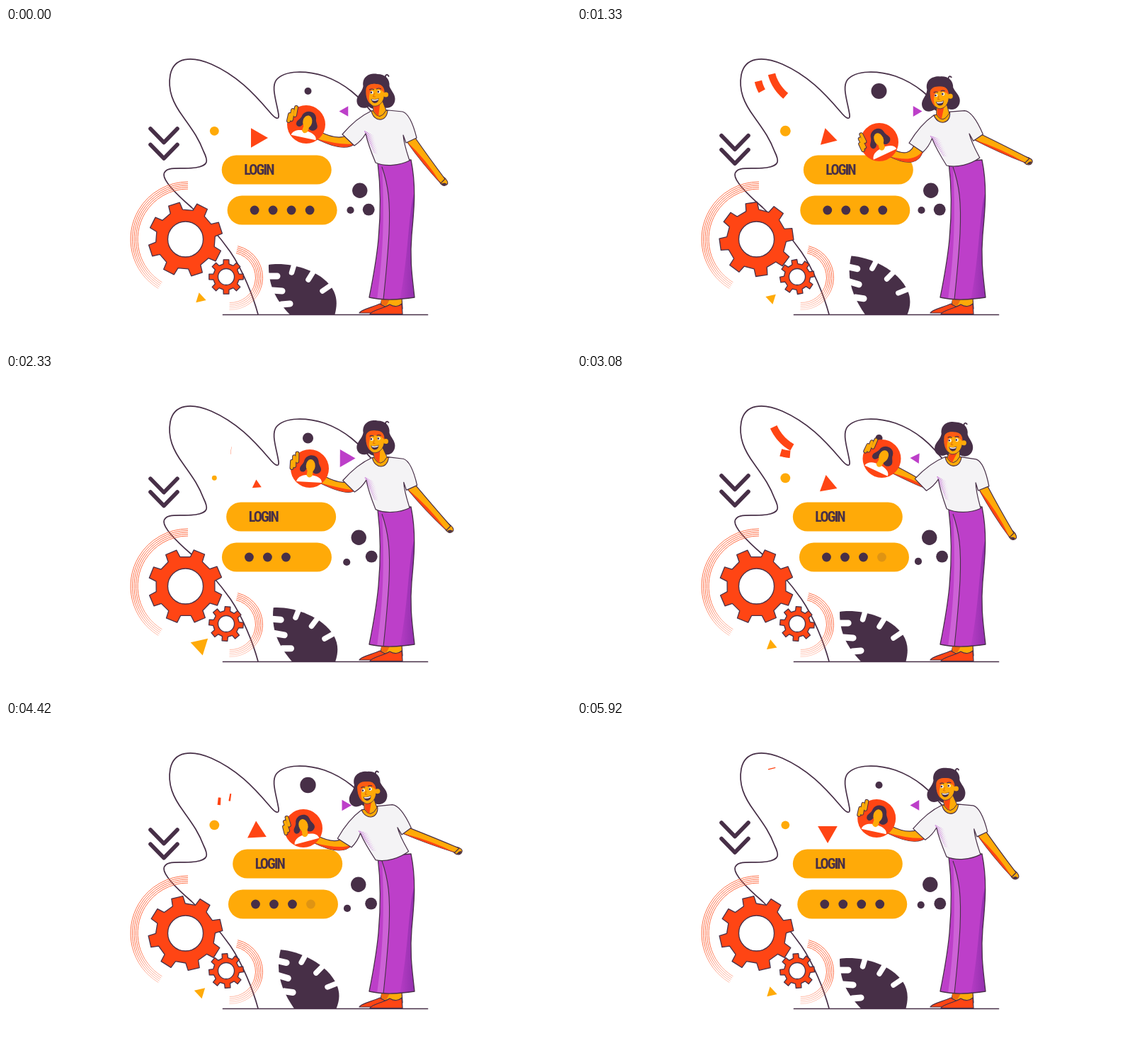
These frames come from a looping animation (798x450 px, 6.01 s). An HTML page with a canvas:

```html
<!DOCTYPE html>
<html lang="en">
<head>
<meta charset="utf-8">
<title>Login illustration</title>
<style>
  html, body { margin: 0; width: 100%; height: 100%; overflow: hidden; background: #fff; }
  canvas { display: block; width: 798px; height: 450px; }
</style>
</head>
<body>
<canvas id="stage" width="798" height="450"></canvas>
<script>
const ctx = document.getElementById('stage').getContext('2d');
const DARK = '#472f47', RED = '#ff4514', AMBER = '#ffaa08', PURPLE = '#bd3fc9', SHIRT = '#f4f3f5';
const TAU = Math.PI * 2, RAD = Math.PI / 180;
const LOOP = 6010, STEP = 6000 / 72;
const HIP = [546, 192];

// Poses: time, avatar x/y, avatar tilt, head x/y, body lean, free hand x/y
const POSES = [
  [0, 424, 136, 0, 522.5, 90, 0, 618, 217],
  [1333, 427, 161, -37, 513, 93.5, -9.5, 637, 188],
  [2333, 429, 132, -9, 522.5, 89.5, 1, 626, 217],
  [3083, 430.5, 118, 13, 532.5, 91.5, 3, 615, 227],
  [4417, 420, 150, -27, 510.5, 95, -11, 638, 182],
  [5333, 414, 147, -14, 503.5, 93, -9.5, 629, 195]
];

const clamp = v => Math.max(0, Math.min(1, v));
const smooth = v => { v = clamp(v); return v * v * (3 - 2 * v); };

function poseAt(t) {
  const n = POSES.length;
  const key = i => {
    const turn = Math.floor(i / n), row = POSES[i - turn * n].slice();
    row[0] += turn * 6000;
    return row;
  };
  let i = n - 1;
  while (POSES[i][0] > t) i--;
  const [a, b, c, d] = [key(i - 1), key(i), key(i + 1), key(i + 2)];
  const span = c[0] - b[0], u = (t - b[0]) / span;
  return b.map((v, k) => {
    const m0 = (c[k] - a[k]) / (c[0] - a[0]) * span;
    const m1 = (d[k] - v) / (d[0] - b[0]) * span;
    return smooth(u) * (c[k] - v) + v + u * (1 - u) * ((1 - u) * m0 - u * m1);
  });
}

function linear(keys, p) {
  let i = 0;
  while (i < keys.length - 2 && keys[i + 1][0] <= p) i++;
  const [a, b] = [keys[i], keys[i + 1]], u = (p - a[0]) / (b[0] - a[0]);
  return a.map((v, k) => v + (b[k] - v) * u);
}

function shape(path, fill, line = 0, color = DARK) {
  const p = typeof path === 'string' ? new Path2D(path) : path;
  if (fill) { ctx.fillStyle = fill; ctx.fill(p); }
  if (line) { ctx.strokeStyle = color; ctx.lineWidth = line; ctx.stroke(p); }
}

function dot(x, y, r, fill, alpha = 1) {
  ctx.globalAlpha = alpha;
  ctx.fillStyle = fill;
  ctx.beginPath();
  ctx.arc(x, y, r, 0, TAU);
  ctx.fill();
  ctx.globalAlpha = 1;
}

function turned(x, y, deg, draw) {
  ctx.save();
  ctx.translate(x, y);
  ctx.rotate(deg * RAD);
  draw();
  ctx.restore();
}

function triangle(x, y, r, deg, fill) {
  const p = new Path2D();
  for (let i = 0; i < 3; i++) {
    const a = (deg + i * 120) * RAD;
    p.lineTo(x + r * Math.cos(a), y + r * Math.sin(a));
  }
  shape(p, fill);
}

function gear(x, y, inner, outer, hole, deg) {
  const p = new Path2D();
  for (let i = 0; i < 8; i++) {
    for (const [off, r] of [[-12.5, inner], [-9, outer], [9, outer], [12.5, inner]]) {
      const a = (deg + i * 45 + off) * RAD;
      p.lineTo(x + r * Math.cos(a), y + r * Math.sin(a));
    }
  }
  p.closePath();
  shape(p, RED, 1.3);
  dot(x, y, hole, '#fff');
  ctx.strokeStyle = DARK;
  ctx.stroke();
}

function rings(x, y, r, from, to) {
  const fade = ctx.createLinearGradient(0, y + r * 0.2, 0, y + r);
  fade.addColorStop(0, '#ff7048');
  fade.addColorStop(1, 'rgba(255,112,72,.3)');
  ctx.strokeStyle = fade;
  ctx.lineWidth = 1;
  for (let i = 0; i < 5; i++) {
    ctx.beginPath();
    ctx.arc(x, y, r - i * 2.5, from * RAD, to * RAD);
    ctx.stroke();
  }
}

// A wide arc that enters at its far end and leaves at its near end
function ribbon([x0, y0, x1, y1, x2, y2, x3, y3], u) {
  if (u <= 0 || u >= 1) return;
  const from = 1 - smooth(u / 0.64), to = 1 - u * u;
  ctx.beginPath();
  for (let i = 0; i <= 16; i++) {
    const s = from + (to - from) * i / 16, r = 1 - s;
    const mix = (a, b, c, d) => r * r * r * a + 3 * r * r * s * b + 3 * r * s * s * c + s * s * s * d;
    ctx.lineTo(mix(x0, x1, x2, x3), mix(y0, y1, y2, y3));
  }
  ctx.strokeStyle = RED;
  ctx.lineWidth = 10.5;
  ctx.lineCap = 'butt';
  ctx.stroke();
}

function chevron(y) {
  ctx.lineCap = ctx.lineJoin = 'round';
  shape(`M204 ${y}L223 ${y + 19.5}L242 ${y}`, null, 5.6);
}

function field(x, y) {
  ctx.fillStyle = AMBER;
  ctx.beginPath();
  ctx.roundRect(x, y, 155, 41, 20.5);
  ctx.fill();
}

function backdrop(t, sway) {
  shape('M356 404C349 378 334 341 317 316C298 289 282 272 262 253C240 234 223 217 223 207' +
    'C224 193 250 200 268 197C286 194 286 188 279 174C271 153 261 141 250 125' +
    'C236 106 228 88 232 66C237 41 262 39 290 51C326 67 349 91 372 118' +
    'C381 129 386 130 385 122C382 103 374 83 382 73C394 59 425 60 450 68C478 78 500 96 522 126', null, 1.7);
  rings(257, 298, 81, 121, 270);
  rings(317, 352, 45.5, -77, 92);
  const spin = t / 6000 * 360;
  gear(253.5, 298, 42, 52.5, 25, -108 - spin);
  gear(311, 351, 18.5, 24.5, 11.5, -90 + spin);
  chevron(142 + 10 * sway);
  chevron(164.5 + 8 * sway ** 3);
}

function confetti(t, p, sway, swing) {
  dot(294.3, 145.3, 6.4 + 3 * swing, AMBER);
  dot(426.5, 89, 5 + 6.2 * sway, DARK);

  const [, redTurn, redSize] = linear([[0, 0, 16], [.027, 20, 14.3], [.443, 135, 14], [.473, 147, 15.5],
    [.777, 265, 7.5], [.973, 330, 16], [1, 360, 16]], p);
  triangle(354, 155, redSize, redTurn, RED);

  const [, turn, size] = linear([[0, 0, 8.5], [.443, 60, 8.5], [.777, 60, 14.5], [.973, 120, 8.5], [1, 120, 8.5]], p);
  triangle(479, 117.5, size, turn + 180, PURPLE);
  triangle(274.5, 381.5, size, turn + 17, AMBER);

  ribbon([275, 65, 279, 83, 297, 104, 318, 106.5], (t % 2000 - 285) / 1650);
  for (const start of [110, 2805, 4278]) ribbon([256, 75, 261, 98, 279, 111, 304, 112], (t - start) / 1390);
}

function form(beat, sway, swing) {
  const x = 304.7 + 15.6 * sway;
  field(x, 179.5);
  ctx.fillStyle = DARK;
  ctx.font = 'bold 20px "Roboto Condensed", "Open Sans Condensed", "Open Sans", sans-serif';
  ctx.fontStretch = 'extra-condensed';
  ctx.letterSpacing = '-1.8px';
  ctx.textBaseline = 'alphabetic';
  ctx.fillText('LOGIN', x + 31.5, 207.2);

  const y = 236.5, left = 312.6 + 7.8 * swing;
  field(left, y);
  const pulse = (1 + Math.cos(beat * TAU)) / 2;
  for (let i = 0; i < 4; i++) dot(left + 38.5 + i * 26, y + 20.5, 6.4, DARK, i < 3 ? 1 : clamp(pulse * 1.2));

  const out = 1 - pulse;
  dot(499 + 1.3 * Math.cos((beat - 0.15) * TAU), 229.3, 10.7, DARK);
  dot(486.5 - 5.3 * out, 257 + 7 * out, 5.1, DARK);
  dot(512.2 + 4 * out, 256.2, 8.4, DARK);
}

function leaf(sway) {
  ctx.save();
  ctx.beginPath();
  ctx.rect(340, 290, 160, 114);
  ctx.clip();
  turned(437, 404, 12.7 * sway, () => {
    ctx.translate(-437, -404);
    shape('M371 334C395 330 440 338 460 366C469 380 469 394 460 418L416 418C390 396 370 372 371 334Z', DARK);
    ctx.lineCap = 'round';
    shape('M408 330L403.5 345M437 339L427 355M466 358L447 371', null, 7.5, '#fff');
    shape('M371 350L383 350M376 370L390 371M389 390L401 389', null, 9, '#fff');
  });
  ctx.restore();
}

function legs() {
  ctx.lineJoin = 'round';
  shape('M531 380L529 392L538 398L560 396L559 380Z', AMBER, 1.2);
  shape('M530 383L542 383L537 392L530 390Z', '#f06a10');
  shape('M499 402C501 397 518 394 528 389C533 393 538 391 541 402Z', RED, 1.2);
  shape('M514 403.5C517 398 533 396 542 390C548 394 555 393 559 389L560 403.5Z', RED, 1.2);

  const body = new Path2D('M525 190C530 230 529 265 526 298C523 330 518 355 513 380C535 385 556 383 577 380' +
    'C574 352 570 328 573 292C576 258 580 225 572 186Z');
  shape(body, PURPLE);
  ctx.save();
  ctx.clip(body);
  shape('M531 196C540 222 543 245 541 290C539 325 536 355 533 383L524 383C530 340 536 280 531 196Z', '#cd62d6');
  const shade = ctx.createLinearGradient(552, 0, 578, 0);
  shade.addColorStop(0, 'rgba(125,40,160,0)');
  shade.addColorStop(1, 'rgba(125,40,160,.7)');
  shape('M577 230C568 260 569 320 556 384L580 384Z', shade);
  ctx.restore();
  shape(body, null, 1.3);
  shape('M531 196C540 222 543 245 541 290C539 325 536 355 533 383', null, 1.1);
}

function torso() {
  const shirt = new Path2D('M516 117C503 123 487 136 475 150L492 166C498 162 504 156 508 149C511 163 517 178 522 190' +
    'C536 196 556 194 570 187C566 175 562 164 561 151L565 162L580 155C576 139 570 121 560 118L540 116Z');
  shape(shirt, SHIRT);
  ctx.save();
  ctx.clip(shirt);
  ctx.fillStyle = '#c779d6';
  for (let row = 0; row < 16; row++) {
    for (let col = 0; col < 8; col++) {
      const r = 0.85 - col * 0.11 - row * 0.025;
      if (r > 0.1) ctx.fillRect(506 + col * 2 + row * 0.9, 145 + row * 2 + col, r * 1.8, r * 1.8);
    }
  }
  ctx.restore();
  shape(shirt, null, 1.2);
  shape('M516 117C519 133 538 134 539 116Z', AMBER, 1.1);
}

function head(x, y, neck, tilt) {
  turned(x, y, tilt, () => {
    shape('M-18 -8C-20 -22 -8 -27 2 -25C13 -25 20 -18 19 -8C21 -2 27 3 27 10C27 20 18 26 9 21' +
      'C2 25 -6 25 -10 21C-20 26 -28 20 -27 11C-26 4 -19 0 -18 -8Z', DARK);
    shape('M14 -18C12 -24 16 -26 18 -22', null, 1.8);
  });
  const [nx, ny] = neck;
  shape(`M${x - 5} ${y + 13}L${nx - 8} ${ny - 4}Q${nx + 1} ${ny + 10} ${nx + 10} ${ny - 6}L${x + 8} ${y + 10}Z`, AMBER, 1);
  shape(`M${x - 4} ${y + 15}L${nx - 7} ${ny - 4}L${nx - 1} ${ny + 3}L${x + 6} ${y + 15}Z`, RED);
  turned(x, y, tilt, () => {
    shape('M-14 -4C-15 8 -11 16 -4 20C4 22 12 14 12 3C13 -6 8 -11 0 -11C-8 -12 -13 -9 -14 -4Z', AMBER, 0.8);
    shape('M-14 -4C-15 8 -11 14 -8 17C-11 9 -10 1 -5 -4C2 -5 8 -4 12 2C12 -7 8 -11 0 -11C-8 -12 -13 -9 -14 -4Z', '#ff5c14');
    dot(14, 4, 3.5, AMBER);
    for (const [ex, ey] of [[-6, 1], [4, 0]]) {
      dot(ex, ey, 2.3, '#fff');
      dot(ex - 0.7, ey, 1.4, DARK);
      shape(`M${ex - 3} ${ey - 4}Q${ex} ${ey - 6} ${ex + 3} ${ey - 4}`, null, 1.2);
    }
    shape('M-2 2L-4 7L-1 7', null, 0.8, '#d65a10');
    shape('M-7 10Q-1 12 4 9Q4 16 -2 16Q-6 15 -7 10Z', DARK);
    shape('M-6 10.5Q-1 12 3.5 10L3 11.5Q-1 13.5 -5.5 12Z', '#fff');
  });
}

function avatar(x, y, tilt) {
  dot(x, y, 27, RED);
  turned(x, y, tilt + 12, () => {
    ctx.save();
    ctx.beginPath();
    ctx.arc(0, 0, 26, 0, TAU);
    ctx.clip();
    shape('M-18 19C-16 10 -6 9 0 9C9 9 18 12 18 19Z', '#fff');
    shape('M-8 -12C-5 -21 10 -22 12 -11C12 -5 19 -1 15 4C11 9 5 7 3 3L-5 1C-7 7 -14 6 -14 1C-14 -4 -9 -5 -8 -12Z', DARK);
    shape('M-3 2L-4 10Q0 15 4 10L5 2Z', AMBER);
    ctx.fillStyle = AMBER;
    ctx.beginPath();
    ctx.ellipse(1, -4, 6.5, 9, 0, 0, TAU);
    ctx.fill();
    ctx.restore();
  });
  turned(x, y, tilt, () => {
    ctx.lineCap = 'round';
    const fingers = 'M-25 -5L-23 -14M-21 -7L-19 -20M-16 -13L-14 -24';
    shape(fingers, null, 6, DARK);
    shape(fingers, null, 4, AMBER);
  });
}

function woman(t) {
  const [, ax, ay, tilt, hx, hy, lean, rx, ry] = poseAt(t);
  const c = Math.cos(lean * RAD), s = Math.sin(lean * RAD);
  const onTorso = (x, y) => {
    const [dx, dy] = [x - HIP[0], y - HIP[1]];
    return [HIP[0] + dx * c - dy * s, HIP[1] + dx * s + dy * c];
  };
  legs();

  // Arm holding the avatar
  const top = onTorso(483, 151), low = onTorso(493, 163);
  const under = `${low}Q${ax + 54} ${ay + 40} ${ax + 14} ${ay + 20}`;
  shape(`M${ax + 19} ${ay + 10}Q${ax + 44} ${ay + 23} ${top}L${under}Z`, AMBER, 1.2);
  shape(`M${under}Q${ax + 50} ${ay + 30} ${low}Z`, RED);

  // Free arm
  const outer = onTorso(578, 155), inner = onTorso(566, 160);
  const mx = (outer[0] + inner[0]) / 4 + rx / 2, my = (outer[1] + inner[1]) / 4 + ry / 2;
  turned(rx, ry, Math.atan2(ry - my, rx - mx) / RAD, () => {
    shape('M-6 -4C0 -6 6 -5 6 -1C6 4 1 6 -4 4Z', AMBER, 1.1);
    shape('M0 4C4 4 6 2 5 -2L2 0Z', DARK);
  });
  const back = `${rx - 4} ${ry + 2}Q${mx - 7} ${my + 4} ${inner}`;
  shape(`M${outer}Q${mx + 2} ${my - 5} ${rx + 2} ${ry - 4}L${back}Z`, AMBER, 1.2);
  shape(`M${back}Q${mx} ${my} ${rx - 4} ${ry + 2}Z`, RED);

  turned(HIP[0], HIP[1], lean, () => {
    ctx.translate(-HIP[0], -HIP[1]);
    torso();
  });
  head(hx, hy, onTorso(527, 122), lean * 0.5);
  avatar(ax, ay, tilt);
}

function draw(now) {
  const frame = Math.min(71, Math.floor((now % LOOP + 5) / STEP));
  const t = frame * STEP;
  const p = t / 3000 % 1, beat = frame % 8 / 8;
  const sway = (1 - Math.cos(p * TAU)) / 2, swing = Math.sin(p * TAU);

  ctx.fillStyle = '#fff';
  ctx.fillRect(0, 0, 798, 450);
  ctx.lineCap = 'butt';
  backdrop(t, sway);
  confetti(t, p, sway, swing);
  form(beat, sway, swing);
  leaf(sway);
  woman(t);
  ctx.lineCap = 'round';
  shape('M306.5 404.5L595.5 404.5', null, 1.7);
}

const begin = performance.now();
function tick() {
  draw(performance.now() - begin);
  requestAnimationFrame(tick);
}
tick();
</script>
</body>
</html>
```
